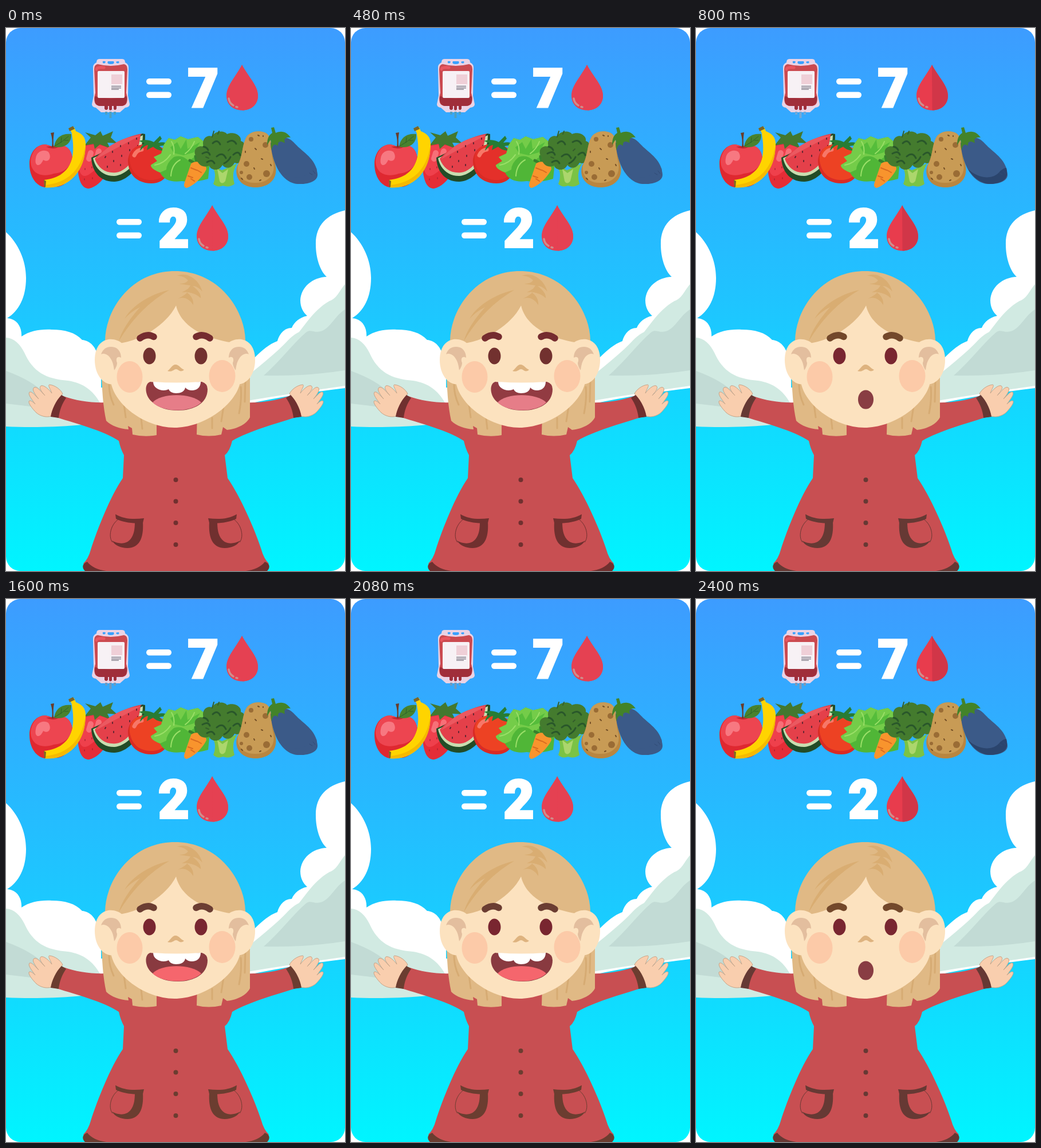
Animation of 592 by 947 pixels, one loop 3.2 s. Source, as an HTML page:

```html
<!DOCTYPE html>
<html lang="en">
<head>
<meta charset="utf-8">
<title>Blood, fruit and vegetables</title>
<style>
html, body { margin: 0; width: 100%; height: 100%; overflow: hidden; background: #fff; }
svg { display: block; width: 592px; height: 947px; animation: look 3.2s step-end infinite; }

/* Four hard steps: the mouth alternates and the colours shift with it. */
@keyframes look {
  0% { --open: visible; --shut: hidden; --trim: #70302f; --brow: #752c2f; --eye: #72312f; --mouth: #923b42;
       --tongue: #e67d88; --tomato: #e4302a; --drop: #e54152; --half: #e54152; --shade: #3b5a88; --port: #4f9fc0; }
  25% { --open: hidden; --shut: visible; --trim: #663934; --brow: #73482b; --eye: #792630; --mouth: #893d43;
       --tongue: #f5666d; --tomato: #ed4223; --drop: #e83c4d; --half: #d13648; --shade: #2b456d; --port: #73a8d8; }
  50% { --open: visible; --shut: hidden; --trim: #6b3d30; --brow: #6b3d32; --eye: #792630; --mouth: #893a40;
       --tongue: #f5666d; --tomato: #ed4223; --drop: #e54152; --half: #e54152; --shade: #3b5a88; --port: #6f9ac0; }
  75% { --open: hidden; --shut: visible; --trim: #663934; --brow: #73482b; --eye: #792630; --mouth: #893d43;
       --tongue: #f5666d; --tomato: #ed4223; --drop: #e83c4d; --half: #d13648; --shade: #2b456d; --port: #8298b5; }
}
.trim { fill: var(--trim); }
.open { visibility: var(--open); }
.shut { visibility: var(--shut); }
.line { fill: none; stroke-linecap: round; stroke-linejoin: round; }
.digit { font: 900 92px Roboto, sans-serif; text-anchor: middle; fill: #fff; stroke: #fff; stroke-width: 4; }
</style>
</head>
<body>
<svg viewBox="0 0 592 947">
<defs>
  <linearGradient id="sky" x2="0" y2="1">
    <stop stop-color="#3d9cff"/><stop offset=".5" stop-color="#1fc4ff"/><stop offset="1" stop-color="#00f5ff"/>
  </linearGradient>
  <clipPath id="card"><rect width="592" height="947" rx="25"/></clipPath>

  <g id="drop">
    <path fill="var(--drop)" d="M412 64C402 84 385 100 385 118C385 134 397 143.500 412.500 143.500C428 143.500 440 134 440 118C440 100 422 84 412 64Z"/>
    <path fill="var(--half)" d="M412 64C422 84 440 100 440 118C440 134 428 143.500 412.500 143.500Z"/>
    <path class="line" stroke="#cf8d8b" stroke-width="3.500" d="M389 123Q390 131 397 135M402 137.500L404 138"/>
  </g>
  <g id="equals" fill="#fff">
    <rect x="245" y="88" width="44" height="10.500" rx="5.200"/>
    <rect x="245" y="111.500" width="44" height="10.500" rx="5.200"/>
  </g>

  <g id="arm">
    <path fill="#f9ceae" stroke="#c5a489" d="M79 677C69 680 59 676 53 671C46 664 39 655 40 651C42 648 47 652 51 656C44 646 38 639 41 635C45 633 51 641 57 647C49 637 45 630 49 627C54 624 61 634 68 641C61 633 57 627 61 624C66 622 75 630 80 637C78 630 72 623 76 622C86 623 96 631 99 638C92 645 83 660 79 677Z"/>
  </g>
  <g id="trim">
    <path d="M97 640L105 645C98 655 93 668 92 680L78 678C80 665 87 650 97 640Z"/>
    <path d="M191 848C206 857 224 857 241 855L239 863C222 865 204 862 192 856Z"/>
    <path d="M239 861C241 891 232 907 212 907C200 907 190 902 185 894C196 900 209 901 217 892C224 884 225 872 225 861Z"/>
    <path fill="none" stroke="var(--trim)" d="M196 857C183 866 178 887 186 897"/>
    <path d="M142 931C133 934 132 941 138 947H175C161 945 149 940 142 931Z"/>
  </g>
  <g id="ear">
    <path fill="#fce2bf" d="M204 551C188 536 155 539 155 579C155 607 172 625 191 621Z"/>
    <path fill="#e3be9e" d="M166 569C170 557 180 554 190 557C198 560 201 568 201 575C194 571 191 577 194 584C194 589 191 594 189 597C188 590 187 583 183 577C179 570 172 566 166 569Z"/>
  </g>
</defs>

<g clip-path="url(#card)">
  <rect width="592" height="947" fill="url(#sky)"/>

  <!-- clouds and hills -->
  <g fill="#fff">
    <path d="M0 356C21 375 35 405 35 436C35 470 22 494 2 506C17 507 28 519 27 538C42 528 60 525 80 526C103 526 121 531 133 544C147 545 158 557 160 573L166 590V627L180 628V670H0Z"/>
    <path d="M592 318C560 325 540 345 541 378C541 400 548 423 560 434C535 435 515 452 514 475C514 487 519 496 526 502C512 505 503 513 499 523C485 523 477 535 474 546C460 551 447 562 434 575L400 658L425 655Q500 639 592 628Z"/>
  </g>
  <g fill="#d1eae2">
    <path d="M0 540C15 541 25 552 32 566C47 600 70 612 108 615C135 619 152 632 165 655L200 682C140 695 60 698 0 695Z"/>
    <path d="M592 447C582 458 578 472 565 476C540 490 524 515 512 530C495 539 490 549 475 562Q455 580 430 600L410 652Q500 637 592 624Z"/>
  </g>
  <g fill="#c2dbd5">
    <path d="M0 598C28 608 53 622 69 638Q78 648 94 667Q45 660 0 655Z"/>
    <path d="M592 491C575 501 567 523 550 529C538 532 532 525 525 530C502 549 480 580 450 606Q520 608 592 597Z"/>
  </g>

  <!-- blood bag -->
  <path fill="#ead3e5" fill-rule="evenodd" d="M163 54H203Q208 54 208 60Q215 63 214 72L213 118L216 133Q216 138 208 139L199 147H166L157 139Q150 138 150 133L153 118L152 72Q151 63 158 60Q158 54 163 54ZM169 58Q168 63 173 61Q176 57 169 58ZM178 58Q175 63 183 63Q191 63 188 58ZM197 58Q190 58 193 61Q199 63 197 58Z"/>
  <path fill="#cb4a50" d="M160 63Q183 69 206 63Q212 64 212 72L210 113Q213 123 211 130Q209 136 200 136H166Q157 136 155 130Q153 123 156 113L154 72Q154 64 160 63Z"/>
  <path fill="#a02e3a" d="M155 119Q183 126 211 119Q213 136 200 136H193V141Q190 145 188 141V136H185V142Q182 145 180 142V136H178V141Q175 145 172 141V136H166Q153 136 155 119Z"/>
  <path class="line" stroke="#e95660" stroke-width="5" d="M158 72Q159 68 171 69"/>
  <rect x="160" y="75" width="47" height="47" rx="2" fill="#f7f1f5"/>
  <path fill="#efcfd7" d="M184 81H203V98H184Z"/>
  <path stroke="#4e4a5b" d="M184 101.500H201M184 104.500H201M184 107H197"/>
  <path stroke="var(--port)" stroke-width="4" d="M175 146V151M182.500 146V157M190 146V151"/>

  <use href="#equals"/>
  <text class="digit" x="344.500" y="137">7</text>
  <use href="#drop"/>
  <use href="#equals" x="-52" y="245"/>
  <text class="digit" x="293" y="382">2</text>
  <use href="#drop" x="-52" y="245"/>

  <!-- strawberry -->
  <path fill="#e42d37" d="M137 205C126 212 122 226 125 245C127 266 132 280 145 280C162 277 180 253 185 236L190 214C176 202 154 199 137 205Z"/>
  <path fill="#ef404c" d="M138 206C126 214 124 230 128 247C132 265 145 260 165 237L187 214C172 203 154 201 138 206Z"/>
  <path class="line" stroke="#f77078" stroke-width="10" d="M148 218L145 228M162 215L160 223"/>
  <path class="line" stroke="#a92531" stroke-width="1.500" d="M134 230v2M138 245v2M150 242v2M137 263v2M151 261v2M162 250v2"/>
  <path fill="#43782f" d="M137 205L148 191L138 182L156 187L165 180L169 188L187 180L183 191L194 201L177 200L182 210L164 203L155 211L153 202Z"/>

  <!-- apple -->
  <path fill="#df2830" d="M80 207C62 196 41 211 41 237C41 264 57 279 72 278C79 274 85 279 94 276C111 271 118 249 116 226C113 205 96 200 80 207Z"/>
  <path fill="#ed4550" d="M80 207C62 196 44 211 43 234C45 257 66 260 83 254C103 253 116 239 115 222C111 205 95 200 80 207Z"/>
  <path fill="#f77881" d="M52 227C53 216 65 210 74 216C81 226 74 236 65 230C59 244 49 241 52 227Z"/>
  <path fill="#c42730" d="M70 207Q82 214 95 206Q84 205 70 207Z"/>
  <path fill="#693d2b" d="M78 183L84 182Q82 193 83 208H80Q82 195 78 183Z"/>
  <path fill="#49822e" d="M84 207C86 191 98 183 114 185C115 201 102 211 84 207Z"/>
  <path class="line" stroke="#2d6229" d="M85 206Q98 199 109 189M96 200L97 191M102 196L109 196"/>

  <!-- banana -->
  <path fill="#ffd400" d="M112 176L119 173L122 180C132 184 140 190 139 205C138 247 112 281 68 278Q66 274 67 265C92 262 111 250 116 224C119 207 116 193 115 184Z"/>
  <path fill="#f5ba00" d="M138 207C132 247 108 270 68 274V278C112 282 140 244 138 207Z"/>
  <path fill="#7c6627" d="M109 175L117 171L120 176L111 180ZM66 265L70 267L69 277L67 278Z"/>

  <!-- watermelon -->
  <path fill="#234c27" d="M149 226C150 252 166 269 190 268C218 266 244 232 243 185L238 184Z"/>
  <path fill="#c9ddb0" d="M152 227C156 246 170 259 190 258C216 255 238 224 239 187Z"/>
  <path fill="#e4404a" d="M155 228C161 245 175 254 192 252C215 249 232 219 235 186L238 184C205 190 174 207 155 228Z"/>
  <path fill="#eb5860" d="M157 229C184 214 207 202 236 187C204 189 174 207 157 229Z"/>
  <path class="line" stroke="#602632" stroke-width="2" d="M174 224l-1 2M186 215v2M200 205v2M214 200v2M228 192v2M188 231v2M202 222v2M216 212v2M177 241v2M200 238v2M230 205v2"/>

  <!-- tomato -->
  <path fill="#d92b25" d="M252 204C228 199 212 215 213 235C215 259 232 271 254 271C273 271 286 259 285 235C284 215 272 203 252 204Z"/>
  <path fill="var(--tomato)" d="M252 204C228 199 214 214 216 232C220 256 235 266 258 265C278 262 284 250 284 231C283 213 271 204 252 204Z"/>
  <path class="line" stroke="#f77768" stroke-width="7" d="M224 222Q228 213 237 212"/>
  <path fill="#277c34" d="M232 197C243 194 250 195 258 199L269 188L272 193L266 200C275 198 280 200 284 204C276 205 272 205 268 206L275 214C266 214 260 210 257 207L246 213L248 204C241 205 238 211 234 214C235 207 239 203 242 201Z"/>

  <!-- cabbage -->
  <path fill="#50b637" d="M276 203L284 192L295 195L305 189L318 194L335 190L349 201L356 235L353 263Q331 270 307 267Q278 271 269 252Q252 245 253 239L264 232L258 225L271 219Z"/>
  <path fill="#74cc49" d="M276 203L284 192L295 195L305 189L318 194L335 190L349 201L343 219Q329 222 320 233Q308 220 293 225Q280 236 280 247L269 252Q252 245 253 239L264 232L258 225L271 219Z"/>
  <path fill="#55bd3b" d="M287 208L299 199L305 211L315 194L317 211L339 199L328 217L310 222L293 218Z"/>
  <path class="line" stroke="#9adf68" stroke-width="2" d="M260 239Q277 236 287 221M293 220Q295 207 289 198M313 219Q324 211 329 198M288 258Q289 238 304 230"/>

  <!-- carrot -->
  <path class="line" stroke="#37812d" stroke-width="5" d="M334 238L331 224M339 237L345 226M332 237L321 231"/>
  <path fill="#f8942d" d="M323 237C330 229 350 235 350 246C344 259 329 275 315 279Q309 278 312 269Z"/>
  <path class="line" stroke="#d96b20" stroke-width="2" d="M323 244l10 4M341 252l-7-4M318 258l8 3M329 267l-6-4"/>

  <!-- broccoli -->
  <path fill="#7bc345" d="M357 237L377 248L404 236Q393 252 399 272Q390 279 379 275Q369 279 362 272Q370 252 357 237Z"/>
  <path fill="#acd66c" d="M369 246L378 253L388 246L383 267Q377 274 373 267Z"/>
  <path fill="#447b2e" d="M333 225C324 214 334 203 345 207C341 193 351 186 360 189C365 179 381 178 386 185C397 180 412 187 410 197C420 200 420 213 413 218C420 230 408 239 399 235C393 247 382 245 378 239C371 252 356 247 355 240C342 246 332 235 333 225Z"/>
  <path class="line" stroke="#29572a" stroke-width="3" d="M343 219Q353 213 356 221M361 201Q369 193 374 203M387 199Q397 193 402 202M368 224Q378 215 384 227M397 221Q406 213 409 222M351 234Q360 228 364 236M345 207Q351 208 353 213M381 236Q389 232 392 225"/>
  <path class="line" stroke="#345e2b" stroke-width="2" d="M360 190L363 180M370 185L372 180M349 225l5 2M391 211l-3 3"/>

  <!-- potato -->
  <path fill="#b98640" d="M420 190C428 179 445 178 455 184C466 192 462 213 468 231C479 258 463 278 436 278C411 278 397 260 404 240C414 223 412 203 420 190Z"/>
  <path fill="#c89b55" d="M420 190C428 179 445 178 455 184C466 192 462 213 466 231C473 256 457 271 434 270C415 270 402 258 405 239C414 223 412 203 420 190Z"/>
  <g fill="#9a6c35">
    <circle cx="428" cy="194" r="4"/><circle cx="453" cy="204" r="5"/><circle cx="420" cy="237" r="5"/>
    <circle cx="425" cy="260" r="5"/><circle cx="455" cy="254" r="6"/><circle cx="411" cy="252" r="3"/>
  </g>
  <path class="line" stroke="#765026" stroke-width="2" d="M440 187l2 1M435 210l2 2M418 215v2M446 228l2 1M433 244l1 2M462 238l1 2M443 266l2-1M411 262l2 2M449 188v1"/>

  <!-- eggplant -->
  <path fill="#3b5a88" d="M462 201C473 188 490 187 502 199C518 217 542 227 544 255C545 268 526 273 509 272C482 270 465 237 462 201Z"/>
  <path fill="var(--shade)" d="M542 244C546 261 540 269 517 272C499 273 484 261 475 246C493 263 517 265 529 252Q536 244 542 244Z"/>
  <path class="line" stroke="#304b75" d="M530 253l5 3M536 249l4 5"/>
  <path fill="#438329" d="M463 174L468 173L471 183C482 178 491 182 497 191C487 190 485 194 487 201C478 195 474 199 475 206C470 200 465 204 464 213C461 207 464 199 462 195C459 198 458 202 456 204C456 192 459 187 465 183Z"/>

  <!-- coat and hands -->
  <use href="#arm"/><use href="#arm" transform="matrix(-1 0 0 1 594 0)"/>
  <path fill="#c84f52" d="M100 642C122 650 148 654 176 653H418C445 654 471 650 494 642Q504 656 506 679C471 690 424 703 395 720Q391 738 382 745L387 785C409 817 434 873 446 910Q450 925 459 934L448 947H146L135 934Q144 925 148 910C160 873 182 817 204 785L206 745Q200 734 197 720C170 702 123 690 88 679Q90 656 100 642Z"/>
  <g class="trim">
    <use href="#trim"/><use href="#trim" transform="matrix(-1 0 0 1 594 0)"/>
    <circle cx="296.500" cy="788" r="4"/><circle cx="296.500" cy="825.500" r="4"/>
    <circle cx="296.500" cy="863" r="4"/><circle cx="296.500" cy="901" r="4"/>
  </g>

  <!-- head -->
  <path fill="#e0b985" d="M173 545C174 490 219 424 295 424C371 424 417 490 418 545L426 590V679C420 691 404 699 386 701L379 696L376 709Q354 714 333 709L334 670H263V710Q242 714 221 709L220 698L213 694L214 700C199 699 184 694 175 685Q167 650 167 590Z"/>
  <path class="line" stroke="#d6ab73" stroke-width="3" d="M180 622Q180 640 188 657M205 649L209 679M235 672L238 699M360 680V698M380 660L376 686M410 626Q412 647 407 672M418 612L417 652"/>
  <path fill="#fce2bf" d="M297 484C281 517 230 551 184 551V622C194 661 246 697 294 697C344 697 397 660 408 622L417 551C365 548 307 528 297 484Z"/>
  <use href="#ear"/><use href="#ear" transform="matrix(-1 0 0 1 590 0)"/>
  <g fill="#d9ad72">
    <path d="M285 457C244 466 217 489 207 507Q219 494 234 487C214 509 202 529 197 546C222 504 254 475 285 457Z"/>
    <path d="M298 432C318 424 338 440 343 460C337 453 332 450 326 450C336 457 341 465 340 471C330 462 322 462 314 460C324 466 328 475 327 483C320 472 310 468 300 472C309 468 314 464 318 460L307 461C315 457 319 455 322 449L302 446C312 446 316 443 318 440C312 434 305 432 298 432Z"/>
  </g>

  <!-- face -->
  <path class="line" stroke="var(--brow)" stroke-width="11.500" d="M234 541Q247 532 258 538.500M332 538.500Q343 532 356 541"/>
  <g fill="var(--eye)">
    <ellipse cx="250.500" cy="572" rx="11" ry="14.500"/><ellipse cx="340.500" cy="572" rx="11" ry="14.500"/>
  </g>
  <g fill="#fccaa8">
    <ellipse cx="216" cy="608.500" rx="22.500" ry="27.500"/><ellipse cx="377.500" cy="607" rx="23" ry="28"/>
  </g>
  <path fill="#deb37f" d="M282 598C288 594 290 587 296 587C302 587 305 594 311 596C304 602 301 595 297 595C293 595 290 601 282 598Z"/>
  <g class="open">
    <path fill="var(--mouth)" d="M252 617C241 620 242 642 255 652C267 663 283 667 300 667C329 667 352 654 352 630Q352 620 342 617Q297 623 252 617Z"/>
    <path fill="var(--tongue)" d="M256 653C271 636 324 636 341 653C323 671 275 671 256 653Z"/>
    <path fill="#fff" d="M257 617Q297 620 340 617C340 627 333 632 325 632Q317 632 313 627C312 634 305 637 297 637Q287 637 284 630C274 635 257 630 257 617Z"/>
  </g>
  <ellipse class="shut" cx="296.500" cy="648" rx="13.500" ry="16.500" fill="var(--mouth)"/>
</g>
</svg>
</body>
</html>
```
